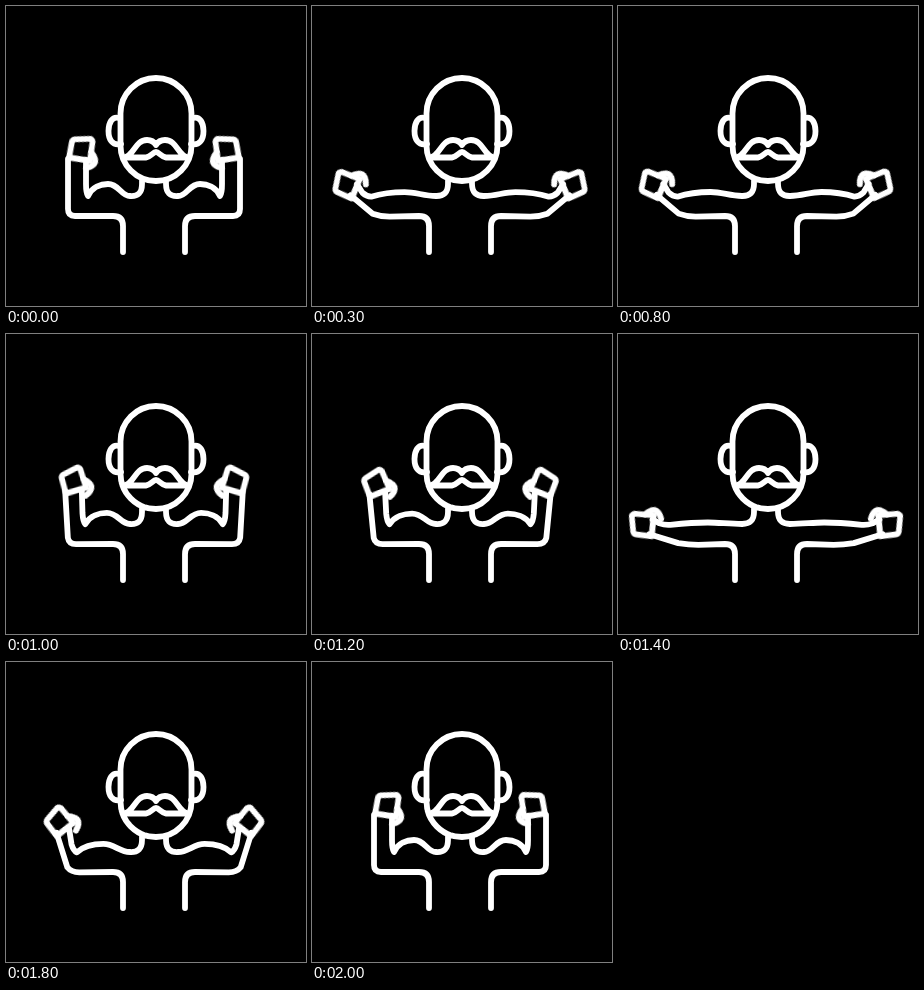
Recreate the animation shown at these times as an HTML page without scripts. Size 300 by 300 pixels, loop 8100 ms.

```html
<!DOCTYPE html>
<html lang="en">
<head>
<meta charset="utf-8">
<title>Flexing strongman</title>
<style>
  html, body { margin: 0; width: 100%; height: 100%; overflow: hidden; background: #000; }
  svg { display: block; width: 100vw; height: 100vh; }
  path, rect {
    fill: none; stroke: #fff; stroke-width: 5.8;
    stroke-linecap: round; stroke-linejoin: round;
  }

  /* two reps in the first 2 s of the loop, then a rest */
  .outer, .inner, .hand, .fist { animation: 8.1s ease-in-out infinite; }
  .outer { animation-name: outer; }
  .inner { animation-name: inner; }
  .hand { animation-name: hand; }
  .fist { animation-name: curl; }

  /* flexed at 0, 1.1 and 2 s; stretched at 0.5-0.6 and 1.5 s */
  @keyframes outer {
    0%, 13.58%, 24.69%, 100% { d: path("M62 153 L62 203 Q62 210 69 210 L107 210 Q117 210 117 220 L117 246"); }
    6.17%, 7.41%, 18.52% { d: path("M27 207 L60 210 Q72 211 82 211 L107 210 Q117 210 117 220 L117 246"); }
  }
  @keyframes inner {
    0%, 13.58%, 24.69%, 100% { d: path("M80 154 L80 178 Q80 187 82 190 C86 181 95 178 102 178 C113 178 115 190 124 190 Q136 191 136 178 L136 175"); }
    6.17%, 7.41%, 18.52% { d: path("M28 190 L36 191 Q42 192 48 191 C60 191 75 190 88 190 C100 190 110 190 124 190 Q136 190 136 178 L136 175"); }
  }
  @keyframes hand {
    0%, 13.58%, 24.69%, 100% { transform: translate(73px, 153px) rotate(-6deg); }
    6.17%, 7.41%, 18.52% { transform: translate(29px, 198px) rotate(-90deg); }
  }
  /* the wrist tips inwards at full flex */
  @keyframes curl {
    0%, 13.58%, 24.69%, 100% { transform: rotate(20deg); }
    1.5%, 12.1%, 14.8%, 23.4% { transform: rotate(0deg); }
  }
</style>
</head>
<body>
<svg viewBox="0 0 300 300">
  <rect x="114.5" y="72" width="71" height="103" rx="35.5"/>
  <path d="M113 112 C106 110 102.5 117 102.5 125 S106 140 115 138"/>
  <path d="M187 112 C194 110 197.5 117 197.5 125 S194 140 185 138"/>
  <path d="M118 151.5 C128 150 129 134 141 134 Q147 134 150 139 Q153 134 159 134 C171 134 172 150 182 151.5 H160 C155 151 153 146 150 146 C147 146 145 151 140 151.5 Z"/>

  <g>
    <path class="outer"/>
    <path class="inner"/>
    <g class="hand">
      <g class="fist">
        <path d="M-10 1 L-11 -15 Q-11 -17 -9 -18 L5 -22 Q8 -23 9 -20 L11 -1 Z"/>
        <path d="M10 -10 Q18 -4 16 1 Q14 5 9 7"/>
      </g>
    </g>
  </g>
  <g transform="translate(296 0) scale(-1 1)">
    <path class="outer"/>
    <path class="inner"/>
    <g class="hand">
      <g class="fist">
        <path d="M-10 1 L-11 -15 Q-11 -17 -9 -18 L5 -22 Q8 -23 9 -20 L11 -1 Z"/>
        <path d="M10 -10 Q18 -4 16 1 Q14 5 9 7"/>
      </g>
    </g>
  </g>
</svg>
</body>
</html>
```
